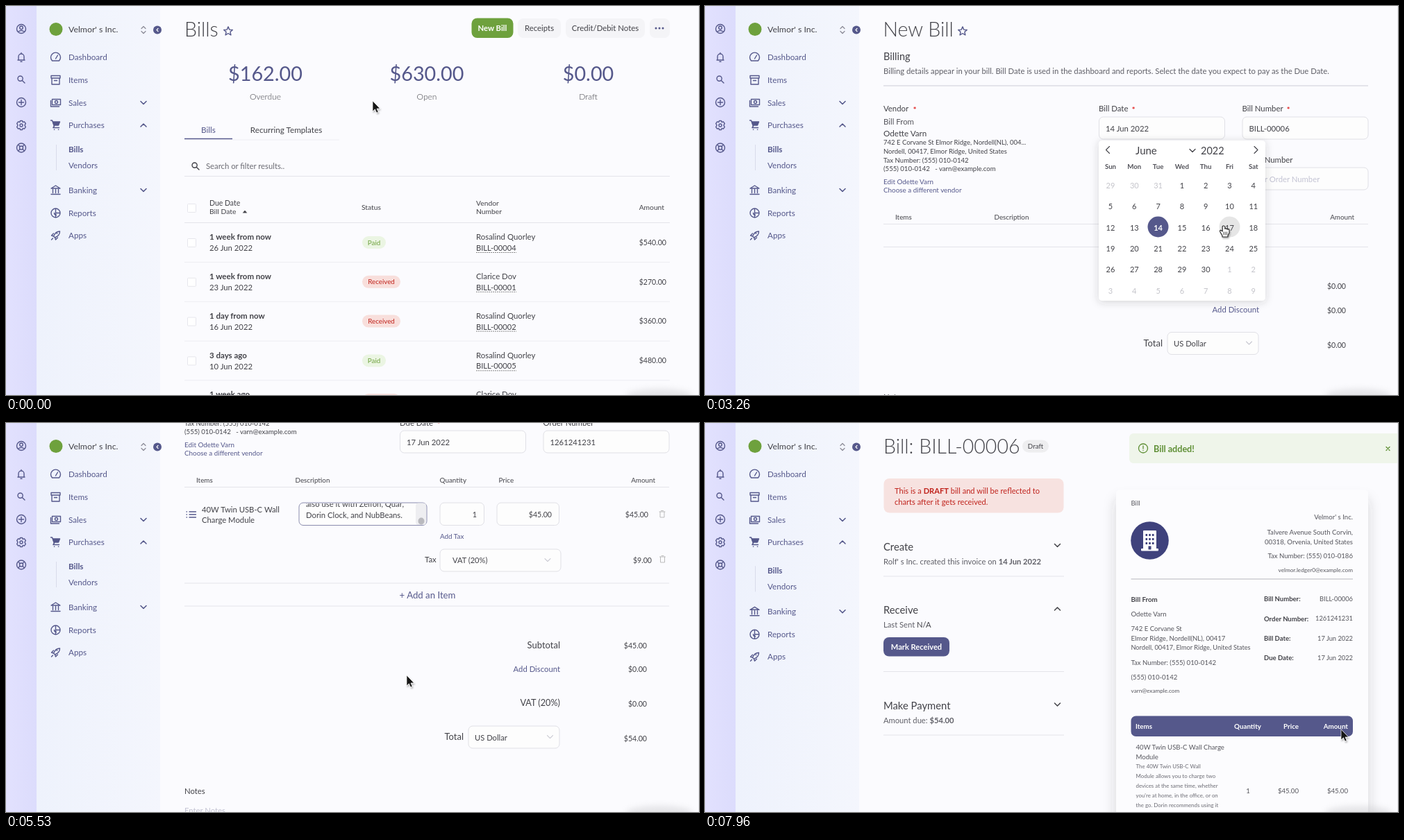
An HTML page for the animation above (8000 ms loop, 998 by 561 pixels).

```html
<!DOCTYPE html>
<html lang="en">
<head>
<meta charset="utf-8">
<title>Creating a bill</title>
<style>
html, body { margin: 0; width: 100%; height: 100%; overflow: hidden; background: #fbfbfe; }
svg { display: block; width: 998px; height: 561px; font-family: Lato, "Open Sans", sans-serif; }
</style>
</head>
<body>
<svg id="stage" viewBox="0 0 998 561" xmlns="http://www.w3.org/2000/svg"></svg>
<script>
const INK = '#424248', PURPLE = '#55588b', GREEN = '#6ea13d', RED = '#c0231c', PALE = '#c3c3d3', LINE = '#e4e4ea', EDGE = '#e0e0e6';
const LOOP = 8000;
const COMPANY = "Velmor' s Inc.", BUYER = 'Odette Varn', ROSA = 'Rosalind Quorley', CLARA = 'Clarice Dov';

// Drawing helpers; text is placed by the middle of its capitals.
const T = (x, y, text, size = 11.3, fill = INK, anchor = 'start', weight = 400, extra = '') =>
  `<text x="${x}" y="${(y + size * .36).toFixed(1)}" font-size="${size}" fill="${fill}" text-anchor="${anchor}" font-weight="${weight}" ${extra}>${text}</text>`;
const R = (x, y, w, h, fill, r = 0, stroke = 'none') =>
  `<rect x="${x}" y="${y}" width="${w}" height="${h}" rx="${r}" fill="${fill}" stroke="${stroke}"/>`;
const H = (x1, x2, y, color = LINE, extra = '') => `<path d="M${x1} ${y}H${x2}" stroke="${color}" ${extra}/>`;
const P = (x, y, d, color = PURPLE, w = 1.4, fill = 'none') =>
  `<path transform="translate(${x} ${y})" d="${d}" fill="${fill}" stroke="${color}" stroke-width="${w}" stroke-linecap="round" stroke-linejoin="round"/>`;
const C = (x, y, r, fill) => `<circle cx="${x}" cy="${y}" r="${r}" fill="${fill}"/>`;
const G = (id, ...parts) => `<g id="${id}">${parts.join('')}</g>`;
const each = (list, fn) => list.map(fn).join('');
const ring = (r, x = 0, y = 0) => `M${x - r} ${y}a${r} ${r} 0 1 0 ${2 * r} 0a${r} ${r} 0 1 0 ${-2 * r} 0z`;
const DOWN = 'M-4-2L0 2L4-2', UP = 'M-4 2L0-2L4 2', LEFT = 'M2.5-5L-2.5 0L2.5 5', RIGHT = 'M-2.5-5L2.5 0L-2.5 5';
const LENS = ring(3.6, -1.4, -1.4) + 'M1.4 1.4L5 5';
const TRASH = 'M-4-3.5H4M-3-3.5V4.5H3V-3.5M-1.5-5H1.5';
const STAR = Array.from({length: 10}, (_, i) => {
  const a = i * Math.PI / 5, r = i % 2 ? 3 : 6.6;
  return `${i ? 'L' : 'M'}${(r * Math.sin(a)).toFixed(1)} ${(-r * Math.cos(a)).toFixed(1)}`;
}).join('') + 'z';
const title = (x, text) => T(x, 34, text, 28.5, INK, 'start', 300);
const req = (x, y) => T(x, y, '*', 11, '#e02020', 'middle', 700);
const field = (x, y, w, text, id = '') =>
  R(x + .5, y + .5, w, 32, '#fdfdfd', 6, EDGE) + T(x + 10, y + 17, text, 11.3, INK, 'start', 400, id && `id="${id}"`);
const pill = (x, y, w, text, bg, fill) => R(x, y - 9, w, 18, bg, 9) + T(x + w / 2, y, text, 9.8, fill, 'middle');

function sidebar() {
  const gear = ring(2) + 'M-1.5-6.5H1.5L2.2-4.4L4.4-5.2L6.3-2.6L5 0L6.3 2.6L4.4 5.2L2.2 4.4L1.5 6.5H-1.5L-2.2 4.4L-4.4 5.2L-6.3 2.6L-5 0L-6.3-2.6L-4.4-5.2L-2.2-4.4z';
  const rail = [
    [33, ring(6.5) + ring(2.3, 0, -1.7) + 'M-4.4 4.6Q0 0 4.4 4.6'],
    [74, 'M-5 4H5M-4 4V-1a4 4 0 0 1 8 0V4M0-6.5V-5M-1 6.3H1'],
    [106, LENS], [139, ring(6.5) + 'M-3.5 0H3.5M0-3.5V3.5'], [172, gear],
    [204.5, ring(6.5) + ring(2.5) + 'M-4.5-4.5L-2-2M4.5-4.5L2-2M-4.5 4.5L-2 2M4.5 4.5L2 2']
  ];
  const item = (y, label, d) => P(71.5, y, d) + T(90, y, label, 11.7, PURPLE);
  return R(0, 0, 44, 561, 'url(#rail)') + R(44, 0, 178, 561, 'url(#side)') +
    each(rail, ([y, d]) => P(22, y, d)) +
    C(72, 33.5, 9.5, GREEN) + T(90, 34, COMPANY, 12.3) +
    P(198, 34.5, 'M-3-2L0-5L3-2M-3 2L0 5L3 2', '#8a8a96', 1.2) +
    C(218, 34.5, 6, PURPLE) + P(218, 34.5, 'M1-2L-1 0L1 2', '#fff', 1.2) +
    item(74, 'Dashboard', 'M-5 5A7 7 0 1 1 5 5zM0 2L3-3') +
    item(106.5, 'Items', 'M-6.5-6H6.5V-2.5H-6.5zM-5.5-2.5V6.5H5.5V-2.5M-2 1H2') +
    item(139.5, 'Sales', 'M-5-5H7V3H-5zM-7-3V5.5H5' + ring(2, 1, -1)) +
    item(172, 'Purchases', '') + P(71.5, 172, 'M-4-5H6L4 0H-2.5z', PURPLE, 1.4, PURPLE) +
    P(71.5, 172, 'M-7-7H-5L-2 1L-3.5 3.5H5M-2 6.2H-1.8M4 6.2H4.2', PURPLE, 1.5) +
    P(198, 139.5, DOWN, PURPLE, 1.6) + P(198, 172, UP, PURPLE, 1.6) +
    G('submenu',
      `<path d="M72.5 200V237" stroke="#d9dbea"/>`,
      T(90, 206.5, 'Bills', 11.7, PURPLE, 'start', 700), T(90, 230, 'Vendors', 11.7, PURPLE),
      item(265.5, 'Banking', 'M-6.5-2.5L0-6.5L6.5-2.5zM-4-1V4M0-1V4M4-1V4M-6.5 6H6.5'),
      P(198, 265.5, DOWN, PURPLE, 1.6),
      item(298.5, 'Reports', ring(6.5) + 'M0-6.5V0H6.5M-2 0a3 3 0 0 0 3 3M0 0V6'),
      item(331, 'Apps', 'M-3 1C-1-4 3-6 6-6C6-3 4 1-1 3zM-3 1L-6 0L-3-3M-1 3L0 6L3 3M-6 6L-4 4M2-3.2V-2.6'));
}

function billsPage() {
  const total = (x, amount, label) => T(x, 97.5, amount, 28.8, PURPLE, 'middle') + T(x, 130.5, label, 12, INK, 'middle', 300);
  const soft = (x, w, text) => R(x, 18, w, 28, '#f4f4f7', 8) + T(x + w / 2, 32, text, 11.4, INK, 'middle');
  const box = y => R(261.5, y - 5.5, 12, 12, '#fff', 1, '#e6e6ec');
  const rows = [
    ['1 week from now', 26, 1, ROSA, 4, 540], ['1 week from now', 23, 0, CLARA, 1, 270],
    ['1 day from now', 16, 0, ROSA, 2, 360], ['3 days ago', 10, 1, ROSA, 5, 480], ['1 week ago', 6, 0, CLARA, 3, 120]
  ];
  return G('bills', title(257, 'Bills'), P(320, 36.5, STAR),
    G('newButton', R(670.5, 17.5, 60, 28.5, GREEN, 8)), T(700.5, 32, 'New Bill', 11.3, '#fff', 'middle', 700),
    soft(737, 62, 'Receipts'), soft(806, 114, 'Credit/Debit Notes'), soft(927, 29, ''),
    each([936, 941, 946], x => C(x, 32, 1.5, PURPLE)),
    total(373.5, '$162.00', 'Overdue'), total(606, '$630.00', 'Open'), total(838.5, '$0.00', 'Draft'),
    T(291.5, 179, 'Bills', 11.7, PURPLE, 'middle'), T(403.5, 179, 'Recurring Templates', 11.7, INK, 'middle'),
    H(326, 480, 193, '#eeeef3'), H(257, 326, 191.5, PURPLE, 'stroke-width="1.5"'),
    P(273, 231, LENS, INK, 1.4), T(288, 230.5, 'Search or filter results..', 11.3, '#6b6b73'), H(257, 956, 245.5),
    box(291), T(293, 284, 'Due Date', 10.5), T(293, 296.5, 'Bill Date', 10.3), P(344, 296.5, 'M-2.5 1.5L0-1.5L2.5 1.5z', INK, .6, INK),
    T(512, 290, 'Status', 10.3), T(677, 284, 'Vendor', 10.3), T(677, 296.5, 'Number', 10.3), T(948, 290, 'Amount', 10.3, INK, 'end'),
    H(257, 956, 312.5),
    each(rows, ([due, day, paid, name, no, sum], i) => {
      const y = 341 + i * 56.8;
      return box(y) + T(293, y - 8, due, 11.5, INK, 'start', 700) + T(293, y + 8, `${day} Jun 2022`) +
        (paid ? pill(513, y, 34, 'Paid', '#ebf5e3', GREEN) : pill(513, y, 55, 'Received', '#f8dfdc', RED)) +
        T(677, y - 8, name, 11.4) + T(677, y + 8, 'BILL-0000' + no, 11.2) + H(677, 735, y + 14.5, '#888', 'stroke-dasharray="2 1"') +
        T(951, y, `$${sum}.00`, 10.6, INK, 'end') + H(257, 956, y + 28.5, '#ededf2');
    }));
}

function calendar() {
  const days = Array.from({length: 42}, (_, i) => {
    const n = i - 2, x = 584 + 34.3 * (i % 7), y = 259 + 30.3 * Math.floor(i / 7), inside = n > 0 && n < 31;
    return T(x, y, n < 1 ? 31 + n : n > 30 ? n - 30 : n, 11, n === 14 ? '#fff' : inside ? INK : '#c4c4ca', 'middle', n === 14 ? 700 : 400);
  });
  return G('calendar', `<rect x="567" y="194" width="240" height="231" rx="5" fill="#fff" filter="url(#shadow)"/>`,
    P(580, 207.5, LEFT, INK, 1.1), P(793.5, 207.5, RIGHT, INK, 1.1), P(702, 208.5, DOWN, INK, 1.3),
    T(620, 209, 'June', 15), T(714, 209, '2022', 14.5),
    each(['Sun', 'Mon', 'Tue', 'Wed', 'Thu', 'Fri', 'Sat'], (d, i) => T(584 + 34.3 * i, 231.5, d, 9.7, '#55555c', 'middle', 700)),
    C(652.5, 318.5, 15, PURPLE), G('hoverDay', C(755.5, 318.5, 15, '#e6e6e6')), days.join(''));
}

function formPage() {
  const label = (x, y, text, starX) => T(x, y, text, 11.4) + (starX ? req(starX, y + 2) : '');
  const vendorList = G('vendorList',
    `<rect x="257" y="160" width="286" height="204" rx="6" fill="#fff" filter="url(#shadow)"/>`,
    R(265.5, 168.5, 269, 30, '#fff', 6, EDGE), P(277, 184, LENS, '#8a8a96', 1.2), T(290, 184, 'Search or type vendor', 11, '#b8b8c4'),
    G('vendorHover', R(261, 242, 278, 29, '#f0f0f6', 4)),
    each([ROSA, BUYER, CLARA], (n, i) => T(274, 222 + i * 34.5, n)),
    H(257, 543, 325), T(400, 345, '+ New Vendor', 11.5, PURPLE, 'middle'));
  const vendorInfo = G('vendorInfo', T(257, 167, 'Bill From', 11.4, '#55555c'), T(257, 184, BUYER, 11.7),
    T(257, 197, '742 E Corvane St Elmor Ridge, Nordell(NL), 004...', 9.5),
    T(257, 209.5, 'Nordell, 00417, Elmor Ridge, United States', 9.5),
    T(257, 222, 'Tax Number: (555) 010-0142', 9.6),
    T(257, 234.5, '(555) 010-0142 &#160; - varn@example.com', 9.6),
    T(257, 253, 'Edit ' + BUYER, 9.9, PURPLE), T(257, 265.5, 'Choose a different vendor', 9.9, PURPLE));
  const row = G('row', P(267, 354, 'M-7-4H-6.5M-7 0H-6.5M-7 4H-6.5M-3-4H6.5M-3 0H6.5M-3 4H6.5', PURPLE, 1.3),
    T(282, 346.5, '40W Twin USB-C Wall'), T(282, 362, 'Charge Module'),
    R(422, 337, 184, 32.5, '#fdfdfd', 6, '#8a8cae'), R(590, 337.5, 15, 31.5, '#eeeef1', 4),
    `<ellipse cx="598" cy="363.5" rx="4.5" ry="5" fill="#b9b9be"/>`,
    `<g clip-path="url(#note)">${T(432, 338.5, 'also use it with Zelfon, Quar,')}${T(432, 354.5, 'Dorin Clock, and NubBeans.')}</g>`,
    R(625, 337, 63.5, 32.5, '#fdfdfd', 6, EDGE), T(678, 354, '1', 10.8, INK, 'end'),
    R(707, 337, 89.5, 32.5, '#fdfdfd', 6, EDGE), T(786, 354, '$45.00', 10.6, INK, 'end'),
    T(925, 354, '$45.00', 10.6, INK, 'end'), P(945, 353.5, TRASH, '#bbb', 1),
    T(625, 385.5, 'Add Tax', 9.9, PURPLE), T(603, 419, 'Tax', 11.3),
    R(625, 404, 174, 32, '#fdfdfd', 6, EDGE), T(643, 420, 'VAT (20%)', 11.1), P(780, 419.5, DOWN, '#c8c8d0', 1.1),
    T(930, 420, '', 10.6, INK, 'end', 400, 'id="taxSum"'), P(945.5, 418.5, TRASH, '#bbb', 1));
  const itemList = G('itemList', `<rect x="258" y="317" width="697" height="124" rx="6" fill="#fff" filter="url(#shadow)"/>`,
    R(266.5, 325.5, 680, 30, '#fff', 6, EDGE), P(278, 341, LENS, '#8a8a96', 1.2), T(292, 341, 'Type an item name', 11, '#b8b8c4'),
    R(262, 363, 689, 32, '#f0f0f6', 4), T(274, 379, '40W Twin USB-C Wall Charge Module'), T(938, 379, '$45.00', 10.6, INK, 'end'),
    H(258, 955, 403), T(607, 422, '+ New Item', 11.5, PURPLE, 'middle'));
  const sum = (y, id = '') => T(923, y, '$0.00', 10.6, INK, 'end', 400, id && `id="${id}"`);
  const foot = G('foot', H(257, 955, 347.5), T(607, 331.5, '+ Add an Item', 13.2, PURPLE, 'middle'),
    T(798, 404, 'Subtotal', 13, INK, 'end'), sum(404.5, 'subtotal'), T(798, 438, 'Add Discount', 11.3, PURPLE, 'end'), sum(439),
    G('vat', T(798, 487, 'VAT (20%)', 12.7, INK, 'end'), sum(489)),
    G('lower', T(659, 486, 'Total', 13, INK, 'end'), R(666, 470.5, 131, 32, '#fdfdfd', 6, EDGE), T(675, 487, 'US Dollar', 11.2),
      P(783.5, 486, DOWN, '#c8c8d0', 1.1), sum(489, 'total'),
      T(257, 564, 'Notes', 11.3), T(257, 592, 'Enter Notes', 11.3, PALE), H(257, 955, 619),
      T(257, 710, 'Advanced', 14.6), P(945, 708, DOWN, INK, 1.5),
      T(257, 731, 'Select the category, add or edit the footer, and add attachments to your bill.', 11.2),
      H(257, 955, 752.5, '#dddde3', 'stroke-width="1.5"'), T(845, 811, 'Cancel', 12, INK, 'middle'),
      `<rect id="save" x="890" y="797" width="65" height="27" rx="7"/>`, T(922, 811, 'Save', 11.5, '#fff', 'middle', 700, 'id="saveText"'),
      G('dots', each([915, 922, 929], x => C(x, 814, 1, '#fff'))),
      T(257, 917, 'Powered By Akaunting: Free Accounting Software &#160; &lt; &gt; &#160; Version 3.0.1', 10.5, '#66666e')));
  return G('form', title(256.5, 'New Bill'), P(371, 36.5, STAR),
    T(257, 73, 'Billing', 14.5),
    T(257, 94, 'Billing details appear in your bill. Bill Date is used in the dashboard and reports. Select the date you expect to pay as the Due Date.', 11.3, '#5f5f67'),
    H(257, 955, 115, '#dddde3', 'stroke-width="1.5"'),
    label(257, 148, 'Vendor', 302), label(567, 148, 'Bill Date', 617), label(773.5, 148, 'Bill Number', 840),
    label(567, 221.5, 'Due Date', 623), label(773.5, 221.5, 'Order Number'),
    field(567, 159.5, 181, '', 'billDate'), field(773.5, 159.5, 181, 'BILL-00006'),
    field(567, 232.5, 181, '', 'dueDate'), field(773.5, 232.5, 181, '', 'order'),
    G('vendorEmpty', R(257.5, 160.5, 285, 102, '#fff', 8, EDGE), P(400, 198, ring(3.5) + 'M-7 11Q0 1 7 11'), T(400, 226, 'Add a Vendor', 11.5, PURPLE, 'middle')),
    vendorInfo,
    T(274, 304.5, 'Items', 9.9), T(416.5, 304.5, 'Description', 9.8), T(663, 304.5, 'Quantity', 9.9, INK, 'end'),
    T(709.5, 304.5, 'Price', 9.9), T(935, 304.5, 'Amount', 9.9, INK, 'end'), H(257, 955, 314.5),
    row, G('rowLine', H(257, 955, 453)), foot, itemList, vendorList, calendar());
}

function resultPage() {
  const section = (y, name, text, d) => T(257, y, name, 14.8) + P(507.5, y - 2, d, INK, 1.5) + T(257, y + 21, text, 11.2, '#5f5f67');
  const b = s => `<tspan font-weight="700">${s}</tspan>`;
  const gray = (x, y, text, size = 9.6, anchor = 'start') => T(x, y, text, size, '#55555c', anchor);
  const right = (y, text, size) => gray(933, y, text, size, 'end');
  const left = (y, text, size) => gray(613.5, y, text, size);
  const head = (x, text, anchor) => T(x, 437.5, text, 9.8, '#fff', anchor, 700);
  const details = [['Bill Number:', 'BILL-00006'], ['Order Number:', '1261241231'], ['Bill Date:', '17 Jun 2022'], ['Due Date:', '17 Jun 2022']];
  const about = ['The 40W Twin USB-C Wall', 'Module allows you to charge two', 'devices at the same time, whether', "you're at home, in the office, or on", 'the go. Dorin recommends using it'];
  return G('result', title(257, 'Bill: BILL-00006'), pill(457, 33.5, 38, 'Draft', '#eeeef0', INK),
    R(257.5, 80, 259, 49.5, '#f7e2e0', 8),
    T(273, 98, `This is a ${b('DRAFT')} bill and will be reflected to`, 11.1, RED), T(273, 113.5, 'charts after it gets received.', 11.1, RED),
    section(178.5, 'Create', `Rolf' s Inc. created this invoice on ${b('14 Jun 2022')}`, DOWN), H(257, 517, 221),
    section(270, 'Receive', `Last Sent <tspan fill="${INK}">N/A</tspan>`, UP),
    R(257, 309, 95, 27.5, PURPLE, 8), T(304.5, 323, 'Mark Received', 11.1, '#fff', 'middle', 700), H(257, 517, 358.5),
    section(408, 'Make Payment', `Amount due: ${b('$54.00')}`, DOWN), H(257, 517, 450),
    `<rect x="592" y="96" width="363" height="490" rx="6" fill="#fcfcfe" filter="url(#cardShadow)"/>`,
    left(115, 'Bill'), C(640.5, 169.5, 27.3, '#3f427c'),
    R(631, 155, 19, 27, '#fff', 1), R(628, 181, 25, 3.5, '#fff', 1),
    each([160, 166, 172], y => each([634.5, 639.2, 643.9], x => R(x, y, 2.6, 3, '#3f427c'))), R(638.5, 177.5, 4, 5, '#3f427c'),
    right(135.5, COMPANY), right(157, 'Talvere Avenue South Corvin,'), right(171, '00318, Orvenia, United States'),
    right(191.5, 'Tax Number: (555) 010-0186'), right(211.5, 'velmor.ledger0@example.com', 8.2),
    H(613.5, 933, 225, '#b5b5bc'),
    T(613.5, 254, 'Bill From', 9.7, INK, 'start', 700), left(275.5, BUYER), left(296, '742 E Corvane St'),
    left(310, 'Elmor Ridge, Nordell(NL), 00417'), left(324, 'Nordell, 00417, Elmor Ridge, United States', 9.2),
    left(345.5, 'Tax Number: (555) 010-0142'), left(366.5, '(555) 010-0142'), left(386, 'varn@example.com', 8.2),
    each(details, ([k, v], i) => T(805, 254 + i * 28.1, k, 9.5, INK, 'start', 700) + right(254 + i * 28.1, v, 9.3)),
    R(613.5, 422.5, 319.5, 29.5, PURPLE, 7), head(620, 'Items', 'start'), head(801, 'Quantity', 'end'), head(855, 'Price', 'end'), head(926, 'Amount', 'end'),
    gray(620.5, 467, '40W Twin USB-C Wall Charge'), gray(620.5, 481, 'Module'),
    each(about, (s, i) => T(620.5, 495.5 + i * 14, s, 7.9, '#6b6b73')),
    gray(782, 530, '1', 9.6, 'middle'), gray(855, 530, '$45.00', 9.6, 'end'), gray(926, 530, '$45.00', 9.6, 'end'),
    G('toast', R(611, 15, 400, 43, '#eff5ea', 6), P(631, 36.5, ring(6.5) + 'M0-3.5V.5M0 3V3.1', '#5f8f35', 1.3),
      T(646, 37, 'Bill added!', 12.6, '#5f8f35', 'start', 700), P(983.5, 37, 'M-2.5-2.5L2.5 2.5M2.5-2.5L-2.5 2.5', '#5f8f35', 1.3)));
}

function cursors() {
  const hand = 'M0 0C-2 0-2 1-1.8 3V8L-4 6.5C-6 6-5.5 8-5 9L-2 14V16H6V14L8 10V6C8 4 6 4.5 5.8 5.5C5.5 3.5 4 3.5 3.8 5C3.5 3 2 3 1.8 4.5V2C1.8 .5 1 0 0 0z';
  return `<g id="cursor" filter="url(#soft)">` + G('arrow', P(0, 0, 'M0 0V15L3.4 11.8L5.7 17L8.2 16L6 11H10.4z', '#fff', .7, '#151515')) +
    G('hand', P(0, 0, hand, '#222', 1.1, '#fff') + P(0, 0, 'M0 9V13M2.3 9V13M4.6 9V13', '#222', .8)) +
    G('ibeam', P(0, 0, 'M-3-7.5Q0-7 0-5Q0-7 3-7.5M0-5V6M-3 7.5Q0 7 0 5Q0 7 3 7.5M-1.5 2H1.5', '#222', 1.3)) + '</g>';
}

const stage = document.getElementById('stage');
stage.innerHTML = `<defs>
  <linearGradient id="rail"><stop stop-color="#e2e1fe"/><stop offset="1" stop-color="#dcdcfc"/></linearGradient>
  <linearGradient id="side"><stop stop-color="#eef2fc"/><stop offset="1" stop-color="#f4f6fd"/></linearGradient>
  <filter id="shadow" x="-10%" y="-10%" width="120%" height="120%"><feDropShadow dx="0" dy="2" stdDeviation="6" flood-color="#333" flood-opacity=".2"/></filter>
  <filter id="cardShadow" x="-10%" y="-10%" width="120%" height="120%"><feDropShadow dx="0" dy="14" stdDeviation="9" flood-color="#333" flood-opacity=".2"/></filter>
  <filter id="soft" x="-60%" y="-60%" width="220%" height="220%"><feDropShadow dx="1" dy="2" stdDeviation="1.2" flood-opacity=".3"/></filter>
  <filter id="blur" x="-50%" y="-100%" width="200%" height="300%"><feGaussianBlur stdDeviation="4"/></filter>
  <clipPath id="note"><rect x="423" y="338" width="167" height="31"/></clipPath>
  </defs>` + R(0, 0, 998, 561, '#fbfbfe') + billsPage() + formPage() + resultPage() + sidebar() +
  `<ellipse cx="941" cy="562" rx="48" ry="10" fill="#c4c4c8" opacity=".4" filter="url(#blur)"/>` +
  '<path d="M997.5 0V561" stroke="#ebebf0"/>' +
  `<rect id="bar" height="3" fill="#a5a0cc"/>` + G('spinner', P(0, 0, 'M0-6.5A6.5 6.5 0 1 0 0 6.5', PURPLE, 1.5)) + cursors();

const el = id => document.getElementById(id);
const show = (id, on) => el(id).setAttribute('display', on ? 'inline' : 'none');
const move = (id, x, y) => el(id).setAttribute('transform', `translate(${x.toFixed(2)} ${y.toFixed(2)})`);
const write = (id, text) => { el(id).textContent = text; };
const linear = u => u, ease = u => u * u * (3 - 2 * u);

// Value k of a keyframe track [[time, ...values], ...].
function track(keys, t, k = 1, curve = linear) {
  const i = keys.findIndex(key => key[0] > t);
  if (i < 0) return keys[keys.length - 1][k];
  if (i === 0) return keys[0][k];
  const a = keys[i - 1], b = keys[i];
  return a[k] + (b[k] - a[k]) * curve((t - a[0]) / (b[0] - a[0]));
}

const PATH = [[60, 528, 137], [260, 700, 32], [1280, 700, 32], [1760, 380, 212], [1950, 380, 212], [2200, 348, 251],
  [2630, 348, 251], [2880, 650, 176], [2980, 650, 176], [3240, 747, 317], [3430, 747, 317], [3560, 850, 250],
  [4100, 850, 250], [4300, 607, 331], [4400, 607, 331], [4520, 560, 379], [4640, 560, 379], [4840, 577, 364],
  [6120, 577, 364], [6420, 916, 442]];
const SHAPES = [[0, 'arrow'], [210, 'hand'], [1340, 'arrow'], [1640, 'hand'], [2410, 'arrow'], [2800, 'ibeam'], [3020, 'hand'],
  [3440, 'arrow'], [3510, 'ibeam'], [4230, 'hand'], [4780, 'ibeam'], [5200, 'arrow'], [6390, 'hand'], [6510, 'arrow']];
const SCROLL = [[5030, 0], [5100, 13.5], [5260, 150], [5430, 150], [5530, 221.5], [5600, 255], [5830, 255], [6100, 544.5]];

function draw(t) {
  const onForm = t >= 960 && t < 7430, done = t >= 7430;
  show('bills', t < 960);
  show('form', onForm);
  show('result', done);
  move('submenu', 0, done ? 6.3 : 0);
  el('newButton').setAttribute('opacity', t >= 210 ? .9 : 1);

  const picked = t >= 2420, hasRow = t >= 4620, summed = t >= 5200, saving = t >= 6510;
  move('form', 0, -track(SCROLL, t));
  show('vendorEmpty', t < 1800);
  show('vendorList', t >= 1800 && !picked);
  show('vendorHover', t >= 2140);
  show('vendorInfo', picked);
  show('calendar', t >= 2940 && t < 3370);
  show('hoverDay', t >= 3210);
  const date = `${t >= 3370 ? 17 : 14} Jun 2022`;
  write('billDate', date);
  write('dueDate', date);
  const typed = '1261241231'.slice(0, Math.max(0, Math.floor((t - 3560) / 40)));
  write('order', typed || 'Enter Order Number');
  el('order').setAttribute('fill', typed ? INK : PALE);
  show('itemList', t >= 4350 && !hasRow);
  show('row', hasRow);
  show('rowLine', hasRow);
  show('vat', summed);
  move('foot', 0, hasRow ? 138.5 : 0);
  move('lower', 0, summed ? 50 : 0);
  write('taxSum', summed ? '$9.00' : '$10.00');
  write('subtotal', summed ? '$45.00' : '$0.00');
  write('total', summed ? '$54.00' : '$0.00');
  el('save').setAttribute('fill', saving ? '#f1f5e9' : GREEN);
  show('saveText', !saving);
  show('dots', t >= 7245);

  const loading = saving && t < 6930;
  show('bar', loading);
  show('spinner', loading);
  el('bar').setAttribute('width', track([[6510, 0], [6560, 81], [6930, 998]], t));
  el('spinner').setAttribute('transform', `translate(993.5 18) rotate(${(t - 6560) * .9})`);
  move('toast', track([[7600, 400], [7800, 0]], t, 1, ease), 0);

  const shape = SHAPES.filter(s => s[0] <= t).pop()[1];
  for (const id of ['arrow', 'hand', 'ibeam']) show(id, id === shape);
  move('cursor', track(PATH, t, 1, ease), track(PATH, t, 2, ease));
}

const start = performance.now();
function tick() {
  draw((performance.now() - start) % LOOP);
  requestAnimationFrame(tick);
}
draw(0);
requestAnimationFrame(tick);
</script>
</body>
</html>
```
